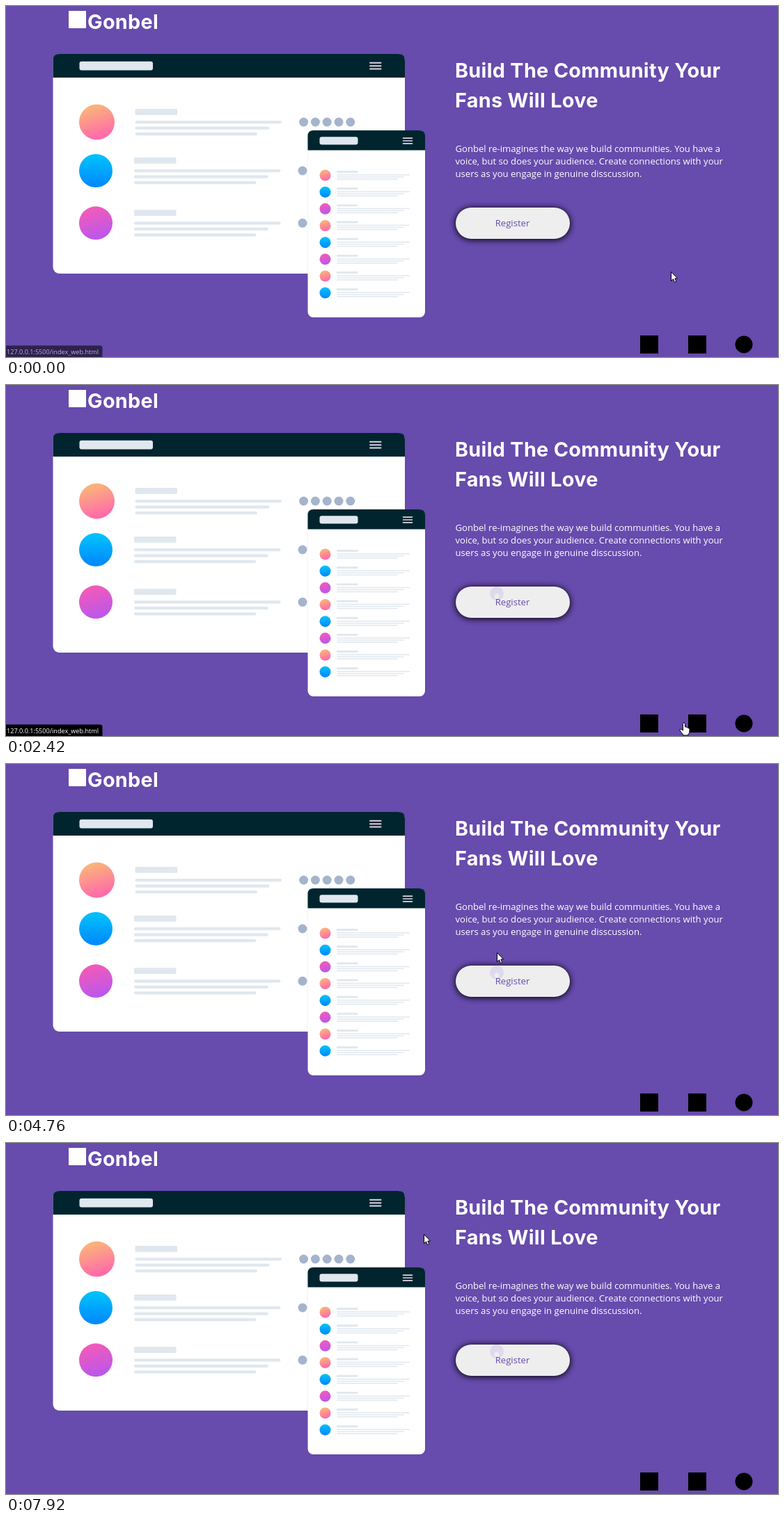
These frames come from a looping animation (1109 by 505 pixels, 7990 ms). An HTML page:

```html
<!DOCTYPE html>
<html lang="en">
<head>
<meta charset="utf-8">
<title>Gonbel</title>
<style>
  html, body { margin: 0; width: 100%; height: 100%; overflow: hidden; background: #674bad; }
  svg { display: block; width: 1109px; height: 505px; }
  text { font: 13.1px "Open Sans", sans-serif; fill: #fff; }
  .title { font: 700 28.8px Inter, sans-serif; letter-spacing: .3px; }
  .status { font-size: 9.1px; }
  .label { fill: #674bad; text-anchor: middle; }
</style>
</head>
<body>
<svg viewBox="0 0 1109 505">
  <defs>
    <linearGradient id="orange" x1=".35" y1="0" x2=".65" y2="1">
      <stop offset=".1" stop-color="#fbb07c"/><stop offset=".9" stop-color="#ff6ca9"/>
    </linearGradient>
    <linearGradient id="blue" x1="0" y1="0" x2="0" y2="1">
      <stop offset=".1" stop-color="#00bffc"/><stop offset=".9" stop-color="#008cfd"/>
    </linearGradient>
    <linearGradient id="pink" x1=".35" y1="0" x2=".65" y2="1">
      <stop offset=".1" stop-color="#f05abb"/><stop offset=".9" stop-color="#bd57ea"/>
    </linearGradient>
    <filter id="glow" x="-20%" y="-50%" width="140%" height="200%"><feGaussianBlur stdDeviation="4.5"/></filter>
  </defs>

  <rect x="90" y="7" width="25" height="25" fill="#fff"/>
  <text class="title" x="117" y="32.5">Gonbel</text>

  <g id="art"></g>

  <text class="title" x="645" y="102.5">Build The Community Your</text>
  <text class="title" x="645" y="146">Fans Will Love</text>
  <text x="645.5" y="210">Gonbel re-imagines the way we build communities. You have a</text>
  <text x="645.5" y="228">voice, but so does your audience. Create connections with your</text>
  <text x="645.5" y="246">users as you engage in genuine disscussion.</text>

  <rect x="645" y="290" width="166" height="47" rx="23.5" opacity=".9" filter="url(#glow)"/>
  <rect x="646" y="290" width="164" height="45" rx="22.5" fill="#eee"/>
  <g id="trace">
    <circle cx="705" cy="300" r="10" fill="#dfd9ee"/>
    <circle cx="705" cy="304" r="3.5" fill="#eee"/>
  </g>
  <text class="label" x="727.5" y="317">Register</text>

  <rect x="911" y="474" width="26" height="26"/>
  <rect x="980" y="474" width="26" height="26"/>
  <circle cx="1060" cy="487" r="12.5"/>

  <g id="status">
    <path d="M0 488.5H135Q138.5 488.5 138.5 492V505H0Z"/>
    <text class="status" x="1" y="500.5">127.0.0.1:5500/index_web.html</text>
  </g>

  <g id="cursor" fill="#fff" stroke="#000" stroke-linejoin="round">
    <path id="arrow" d="M.5.5V13.5L3.5 10.8L5.5 15.5L7.8 14.5L5.8 10H9.6Z"/>
    <path id="hand" d="M-1.6 11V1.5Q-1.5 0 0 0T1.5 1.5V6Q4 5 4.3 7Q6 6 6.4 8Q8 7.5 8 9V12Q8 15 6 16.5V18H-1.5V16.5Q-4 14 -6 11Q-6.5 9 -4.5 9.2Z"/>
    <circle id="click" r="10" fill="#f1eb03" fill-opacity=".5" stroke="none"/>
  </g>
</svg>
<script>
const $ = id => document.getElementById(id);
const PALE = '#e0e7ee', DARK = '#00252e';
const fills = ['orange', 'blue', 'pink'].map(n => `url(#${n})`);

const range = (n, f) => Array.from({ length: n }, (_, i) => f(i)).join('');
const box = (x, y, w, h, fill, r = 0) =>
  `<rect x="${x}" y="${y}" width="${w}" height="${h}" rx="${r}" fill="${fill}"/>`;
const dot = (x, y, r, fill) => `<circle cx="${x}" cy="${y}" r="${r}" fill="${fill}"/>`;

// Window with rounded top bar
const panel = (x, y, w, h, bar, r) => box(x, y, w, h, '#fff', r) +
  `<path fill="${DARK}" d="M${x} ${y + bar}v${r - bar}q0 ${-r} ${r} ${-r}h${w - 2 * r}q${r} 0 ${r} ${r}v${bar - r}z"/>`;

const menu = (x, y, w, gap, h) => range(3, i => box(x, y + i * gap, w, h, '#dfd3e6', h / 2));

// Three text lines, each shorter than the last
const lines = (x, y, w, step, gap, h) =>
  range(3, i => box(x, y + i * gap, w - i * step, h, PALE, h / 2));

function wideRow(i) {
  const y = 167 + i * 70 + (i > 1 ? 5.3 : 0), x = i ? 184 : 185.5, r = i ? 24 : 25.5;
  return dot(105 + r, y, r, fills[i]) + box(x, y - 19, 60.5, 8.8, PALE, 1.5) +
    lines(x, y - 2, 210.5, 17.5, 8.5, 4.2) +
    range(i ? 1 : 5, k => dot((i ? 426 : 427.6) + k * 16.8, y, 6.5, '#a5b4cd'));
}

function phoneRow(i) {
  const y = 243.5 + i * 24.17;
  return dot(458.5, y, 8, fills[i % 3]) + box(475, y - 6.4, 30.5, 2.9, PALE, 1) +
    lines(475, y - 1.2, 105, 8.5, 3, 1.5);
}

$('art').innerHTML =
  panel(67.5, 69, 505.5, 316, 34, 9) + box(105.5, 79.7, 105.5, 12.8, PALE, 3) +
  menu(522, 80.8, 17.5, 4.4, 2) + range(3, wideRow) +
  `<g opacity=".06">${box(432.5, 178, 170.5, 271, '#2b2450', 9)}</g>` +
  panel(433.5, 179, 168.5, 269, 28.5, 8) + box(450.5, 188.3, 55, 11.2, PALE, 3) +
  menu(569.7, 189.3, 14.6, 3.9, 1.6) + range(8, phoneRow);

const LOOP = 7990;
// Pointer stops: time, x, y
const stops = [
  [0, 955, 382], [830, 705, 300], [1310, 718, 317], [1660, 893, 440], [2420, 974, 486],
  [3110, 1015, 486], [3390, 1054, 486], [4000, 1054, 486], [4480, 760, 184], [4760, 705, 271],
  [5150, 650, 300], [5500, 822, 312], [6160, 97, 2], [6350, 97, 2], [6500, 205, 20],
  [6650, 84, 29], [7240, 88, 26], [7920, 600, 131], [LOOP, 600, 131]
];
const clicks = [[900, 1040], [3660, 3790], [6640, 6780]];
const hovers = [[-500, 110], [600, 1250], [1900, 2700]];

const clamp = v => Math.max(0, Math.min(1, v));
const ease = p => p * p * (3 - 2 * p);
const show = (id, on) => $(id).setAttribute('display', on ? 'inline' : 'none');

function pointer(t) {
  const i = stops.findIndex(s => s[0] > t);
  const [t0, x0, y0] = stops[i - 1], [t1, x1, y1] = stops[i];
  const p = ease((t - t0) / (t1 - t0));
  return [Math.round(x0 + (x1 - x0) * p), Math.round(y0 + (y1 - y0) * p)];
}

function draw(t) {
  const [x, y] = pointer(t);
  const onButton = x > 646 && x < 810 && y > 290 && y < 335;
  const hand = onButton || (x > 905 && y > 472);
  $('cursor').setAttribute('transform', `translate(${x} ${y})`);
  show('hand', hand);
  show('arrow', !hand);
  show('click', clicks.some(([a, b]) => t >= a && t < b));
  show('trace', t >= clicks[0][1]);
  const fade = hovers.map(([a, b]) => clamp(Math.min(t - a, b - t) / 200));
  $('status').setAttribute('opacity', Math.max(...fade));
}

function tick(now) {
  draw(now % LOOP);
  requestAnimationFrame(tick);
}

draw(0);
requestAnimationFrame(tick);
</script>
</body>
</html>
```
